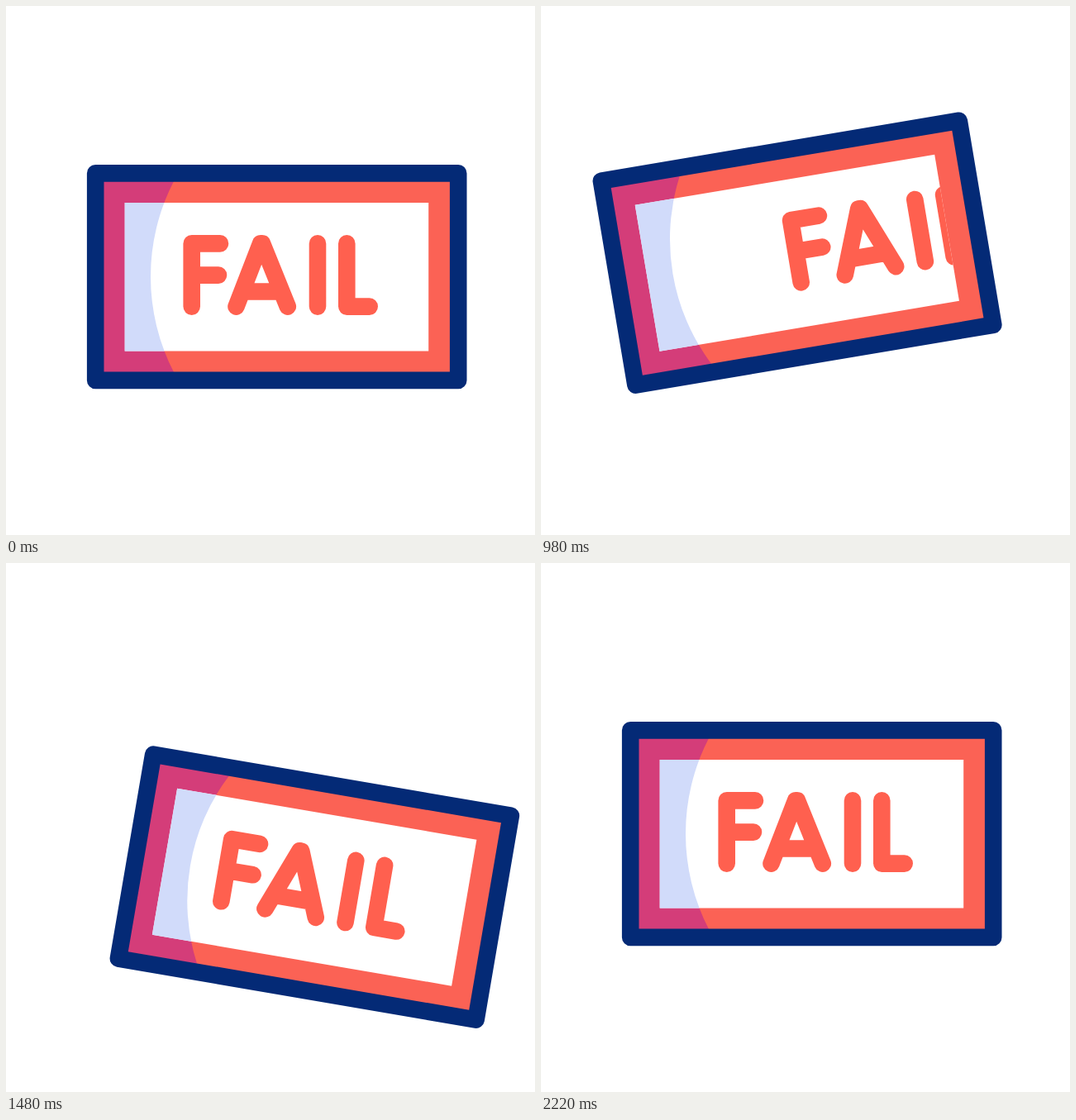
Write an HTML page that moves like this. It is 640x640 px and loops after 2.4 s.

```html
<!DOCTYPE html>
<html lang="en">
<head>
<meta charset="utf-8">
<title>Fail sign</title>
<style>
  html, body { margin: 0; width: 100%; height: 100%; overflow: hidden; background: #fff; }
  svg { display: block; width: 100vw; height: 100vh; }
  .line { fill: none; stroke-linecap: round; stroke-linejoin: round; stroke-width: 20.6; }
</style>
</head>
<body>
<svg viewBox="0 0 640 640" role="img" aria-label="FAIL">
  <defs>
    <clipPath id="window"><rect x="143.7" y="238" width="367.5" height="179.5"/></clipPath>
    <path id="shade" d="M110 212H203A252.2 252.2 0 0 0 203 443H110Z"/>
    <path id="word" class="line" stroke="#ff604f" d="
      M224.7 363.6V287.4H259M224.7 325.6H257
      M278.5 363.6L308 287.4H310L340.8 363.6M291 345.5H328
      M377 287.4V363.6
      M412.3 287.4V363.6H439.7"/>
  </defs>
  <g id="sign">
    <rect x="108" y="202" width="439.3" height="251" fill="#fb6255"/>
    <use href="#shade" fill="#d43d79"/>
    <rect x="143.7" y="238" width="367.5" height="179.5" fill="#fff"/>
    <g clip-path="url(#window)">
      <use href="#shade" fill="#d1dbfa"/>
      <use id="leaving" href="#word"/>
      <use id="entering" href="#word"/>
    </g>
    <rect class="line" x="108.2" y="202.4" width="439" height="250.5" stroke="#042a76"/>
  </g>
</svg>
<script>
const LOOP = 2400, TRAVEL = 466, LAG = -5.7;
const get = id => document.getElementById(id);
const sign = get('sign'), leaving = get('leaving'), entering = get('entering');

// Smooth 0..1 progress between two times
function ease(t, from, to) {
  const u = Math.min(1, Math.max(0, (t - from) / (to - from)));
  return u * u * (3 - 2 * u);
}

function draw(now) {
  const t = now % LOOP;
  const lift = ease(t, 200, 800), drop = ease(t, 800, 1400), back = ease(t, 1400, 2200);
  const slide = drop * (1 - back);
  const angle = -15 * lift + 25 * drop - 10 * back;
  // The sign swings on its lower left corner
  sign.setAttribute('transform',
    `translate(${28.5 * slide} ${26.4 * slide}) rotate(${angle} 108 453)`);

  // The word leaves on the right and comes in again from the left
  leaving.setAttribute('x', TRAVEL * drop);
  leaving.style.display = t < 1400 ? '' : 'none';
  entering.setAttribute('x', LAG * (1 - back) - TRAVEL * (1 - ease(t, 1000, 1400)));
  entering.style.display = t < 1000 ? 'none' : '';
}

const start = performance.now();
function tick() {
  draw(performance.now() - start);
  requestAnimationFrame(tick);
}
tick();
</script>
</body>
</html>
```
